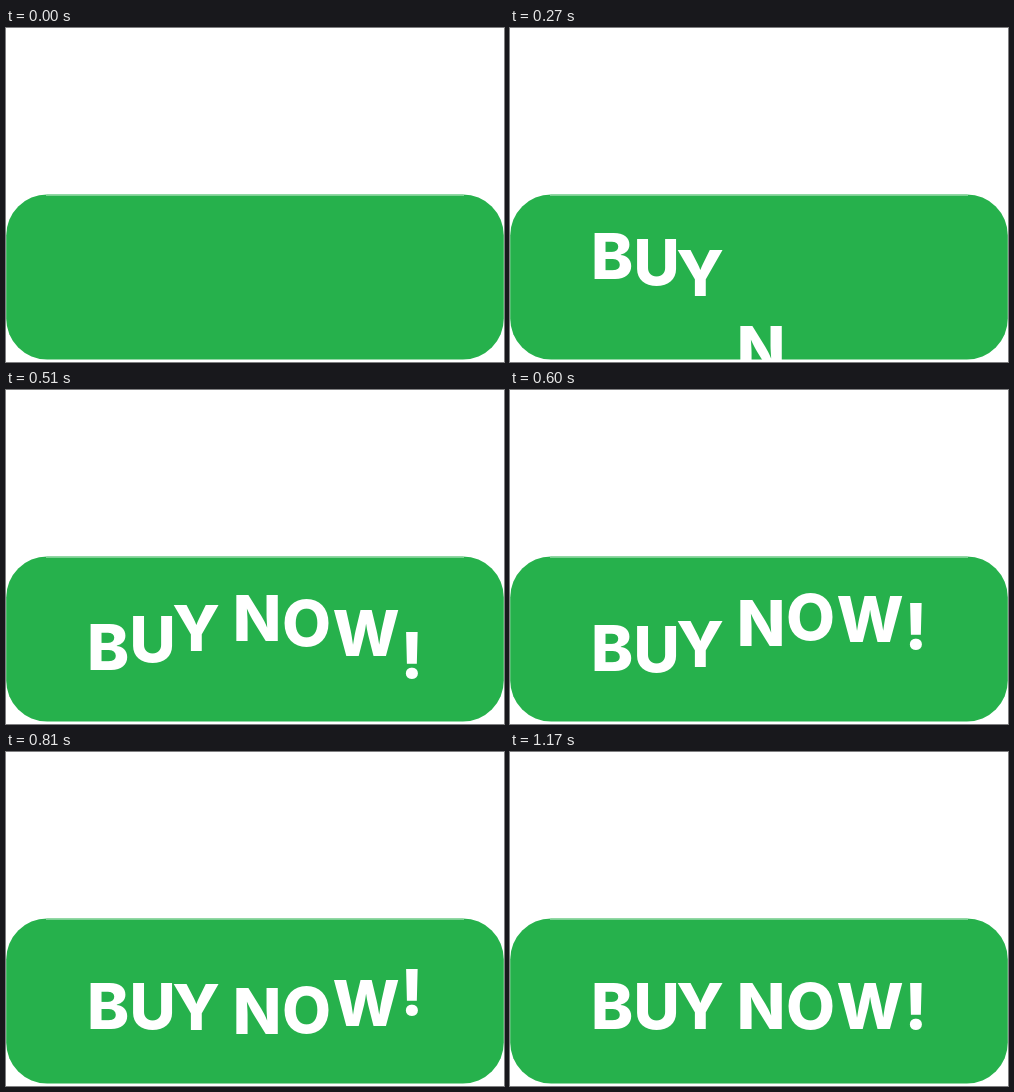
Animation of 498 by 334 pixels, one loop 2.7 s. Source, as an HTML page:

```html
<!DOCTYPE html>
<html lang="en">
<head>
<meta charset="utf-8">
<title>Buy now</title>
<style>
  html, body { margin: 0; height: 100%; overflow: hidden; background: #fff; }
  svg { display: block; width: 498px; height: 334px; }
  text { font: 800 63.5px Inter, "Open Sans", sans-serif; fill: #fff; text-anchor: middle; }
</style>
</head>
<body>
<svg viewBox="0 0 498 334">
  <rect x="0.2" y="166.5" width="497.6" height="165" rx="41" fill="#26b14c"/>
  <path d="M40 167.5H458" stroke="#fff" stroke-opacity=".4"/>
  <g id="label"></g>
</svg>
<script>
const LOOP = 2700, STEP = 30, STAGGER = 58, BASELINE = 277;
const label = document.getElementById('label');

// character, centre x, place in the stagger (the space takes a turn too)
const letters = [
  ['B', 102, 0], ['U', 146.5, 1], ['Y', 190, 2],
  ['N', 251, 4], ['O', 300.5, 5], ['W', 360, 6], ['!', 406, 7]
].map(([char, x, turn]) => {
  const node = document.createElementNS('http://www.w3.org/2000/svg', 'text');
  node.textContent = char;
  node.setAttribute('x', x);
  label.append(node);
  return { node, delay: turn * STAGGER };
});

function glide(t, start, end, from, to) {
  const u = Math.min(1, (t - start) / (end - start));
  return from + (to - from) * u * u * (3 - 2 * u);
}

// Vertical offset: shoot up past the line, dip below it, settle.
function offset(t) {
  if (t < 295) return -31 + 160 * Math.exp(-t / 78);
  if (t < 545) return glide(t, 295, 545, -27.4, 5);
  return glide(t, 545, 760, 5, 0);
}

function draw(now) {
  const t = Math.floor(now % LOOP / STEP) * STEP;
  for (const { node, delay } of letters) {
    node.setAttribute('y', BASELINE + offset(Math.max(0, t - delay)));
  }
}

const start = performance.now();
function tick() {
  draw(performance.now() - start);
  requestAnimationFrame(tick);
}
tick();
</script>
</body>
</html>
```
